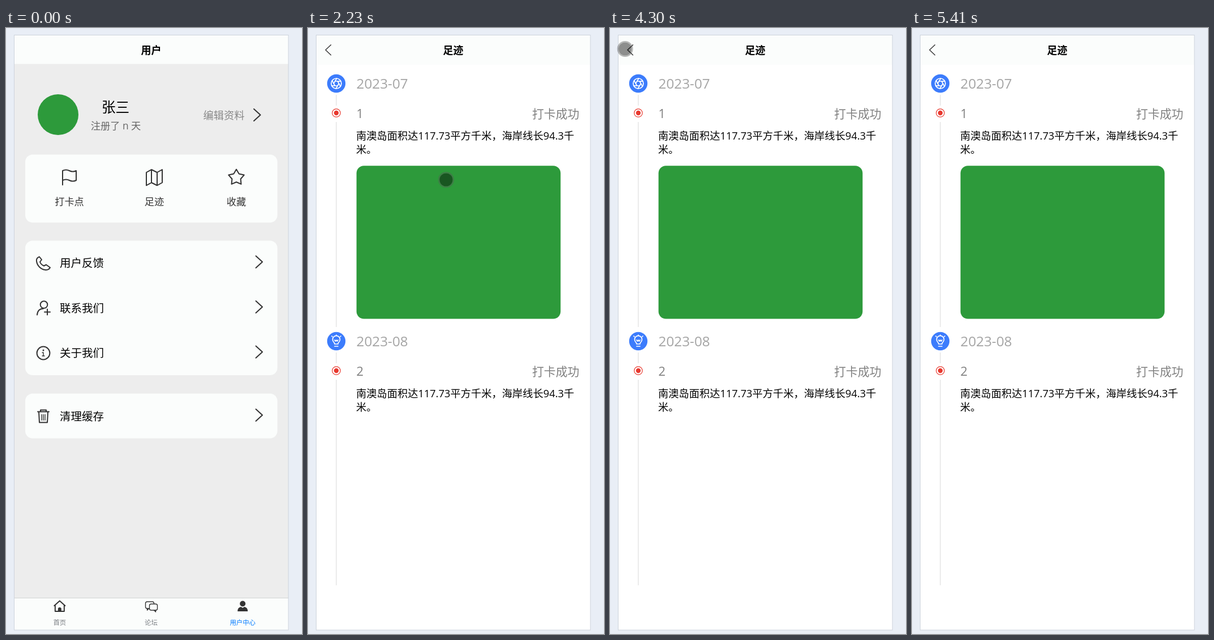
An HTML page for the animation above (6010 ms loop, 523 by 1070 pixels).

```html
<!DOCTYPE html>
<html lang="zh-CN">
<head>
<meta charset="utf-8">
<title>用户</title>
<style>
  html, body { margin: 0; width: 100%; height: 100%; overflow: hidden; background: #e9eef6; }
  svg { display: block; width: 523px; height: 1070px; }
  text { font-family: "Open Sans", "Noto Sans CJK SC", "Noto Sans CJK", sans-serif; }
  .line, .white { fill: none; stroke: #333; stroke-width: 2; stroke-linecap: round; stroke-linejoin: round; }
  .white { stroke: #fff; stroke-width: 1.7; }
  .thin { stroke-width: 1.4; }
  .panel { fill: #fbfdfc; }
  .dark { fill: #333; }
  .green { fill: #2d9a3b; }
  .blue { fill: #3c7cfc; }
  .red { fill: #e8392f; }
  .ring { fill: #fff; stroke: #e8392f; stroke-width: 1.2; }
</style>
</head>
<body>
<svg viewBox="0 0 523 1070" xmlns="http://www.w3.org/2000/svg">
  <g id="user"></g>
  <g id="track"></g>
  <rect x="14.5" y="12.5" width="484.5" height="1050.5" fill="none" stroke="#cdd3dc"/>
  <g id="cursor">
    <circle r="11.6" fill="#000" fill-opacity=".44"/>
    <circle r="12.8" fill="none" stroke="#555" stroke-opacity=".42" stroke-width="2.4"/>
  </g>
</svg>
<script>
const LOOP = 6010;
const STEP = 52;
const LEFT = 14, WIDTH = 485, MIDDLE = LEFT + WIDTH / 2;
const $ = id => document.getElementById(id);

// Text is placed by the vertical middle of its glyphs.
const text = (str, x, mid, size, fill = '#000', anchor = 'middle', weight = 400) =>
  `<text x="${x}" y="${(mid + size * 0.37).toFixed(2)}" font-size="${size}" fill="${fill}" ` +
  `text-anchor="${anchor}" font-weight="${weight}">${str}</text>`;
const rect = (x, y, w, h, cls, r = 0) =>
  `<rect x="${x}" y="${y}" width="${w}" height="${h}" rx="${r}" class="${cls}"/>`;
const block = (y, h, fill) => `<rect x="${LEFT}" y="${y}" width="${WIDTH}" height="${h}" fill="${fill}"/>`;
const circle = (x, y, r, cls) => `<circle cx="${x}" cy="${y}" r="${r}" class="${cls}"/>`;
const path = (d, cls = 'line') => `<path class="${cls}" d="${d}"/>`;
const at = (x, y, shape) => `<g transform="translate(${x} ${y})">${shape}</g>`;
const card = (y, h) => rect(34, y, 445.5, h, 'panel', 13);
const chevron = (x, y) => at(x, y, path('M0-10.5L11.5 0L0 10.5'));
const title = str => text(str, MIDDLE, 39, 18, '#000', 'middle', 700);
const repeat = (n, make) => Array.from({ length: n }, (_, i) => make(i)).join('');
const polar = (r, deg) => {
  const a = deg * Math.PI / 180;
  return `${(r * Math.cos(a)).toFixed(2)} ${(r * Math.sin(a)).toFixed(2)} `;
};

// Icons are drawn around their own centre.
const icons = {
  flag: path('M-12 13V-12q6-3 12 0t12 0V5q-6 3-12 0t-12 0'),
  map: path('M-14-9l9-5 10 5 9-5V9l-9 5-10-5-9 5zM-5-14V9M5-9V14'),
  star: path('M' + repeat(10, i => polar(i % 2 ? 8 : 14.4, i * 36 - 90)) + 'Z'),
  phone: path('M-7-11q-6 2-5 8a18 18 0 0 0 15 15q6 1 9-4l-7-5-4 2q-5-2-7-7l3-4z'),
  contact: circle(1, -6, 6.3, 'line') + path('M-11 12Q-10 1 0 1M2 7h10M7 2v10'),
  info: circle(0, 0, 11.4, 'line') + circle(0, -5, 1.5, 'dark') + path('M-2-1H0V5M-2 5h4', 'line thin'),
  trash: path('M-10-8H10M-5-8v-3H5v3M-8-8l1 19H7L8-8') +
    path(repeat(3, i => `M${i * 3 - 3}-3v10`), 'line thin'),
  home: path('M-9.500-1L0-9.500 9.500-1M-8-2V9H8V-2') + path('M-3 10V5a3 3 0 0 1 6 0v5z', 'dark'),
  chat: rect(-10, -8, 15, 12, 'line thin', 3) + path('M-7 4v3l3-3', 'line thin') +
    rect(-3, -4, 14, 11, 'line thin panel', 3) + path('M8 7v3l-3-3', 'line thin'),
  person: circle(0, -4.5, 5, 'dark') + path('M-9 9q0-7 6-8l3 2 3-2q6 1 6 8z', 'dark'),
  aperture: circle(0, 0, 9, 'white') +
    path(repeat(6, i => `M${polar(4.6, i * 60)}L${polar(4.6, i * 60 + 60)}L${polar(9, i * 60 + 95)}`), 'white'),
  bulb: path('M-3 5q0-2-2-4a6.500 6.500 0 1 1 10 0q-2 2-2 4zM-3 9h6M-3-2l1.500 2L0-2l1.500 2L3-2', 'white') +
    path('M0-10v-1M-7-8l-1-1M7-8l1-1', 'white')
};

function userPage() {
  const shortcuts = [['flag', '打卡点', 112], ['map', '足迹', 262], ['star', '收藏', 407]];
  const rows = [['phone', '用户反馈'], ['contact', '联系我们'], ['info', '关于我们'], ['trash', '清理缓存']];
  const tabs = [['home', '首页'], ['chat', '论坛'], ['person', '用户中心']];
  return [
    block(12, 1051, '#ededed'),
    block(12, 51.5, '#fbfdfc'),
    title('用户'),
    circle(92, 153, 36, 'green'),
    text('张三', 193.5, 139.5, 24.6),
    text('注册了 n 天', 194, 173, 17.3, '#666'),
    text('编辑资料', 385, 154, 18.2, '#888'),
    chevron(438, 153.5),

    card(223.5, 120),
    ...shortcuts.map(([icon, label, x]) =>
      at(x, 264, icons[icon]) + text(label, x, 307, 17.2, '#333')),

    card(375.5, 237.5),
    card(645.5, 79),
    ...rows.map(([icon, label], i) => {
      const y = 415 + i * 79.5 + (icon === 'trash' ? 32 : 0);
      return at(66, y, icons[icon]) + text(label, 95, y, 19.5, '#000', 'start') + chevron(441.5, y - 2);
    }),

    block(1006, 57, '#d2d4d4'),
    block(1007, 56, '#fbfdfc'),
    ...tabs.map(([icon, label], i) => {
      const x = LEFT + WIDTH * (i + 0.5) / 3;
      return at(x, 1021, icons[icon]) + text(label, x, 1050, 11.4, i === 2 ? '#007aff' : '#7a7e83');
    })
  ].join('');
}

function trackEntry(y, month, num, icon, lineEnd) {
  return [
    rect(49.3, y + 20, 1.4, 19, 'rail'),
    rect(49.3, y + 68, 1.4, lineEnd - y - 68, 'rail'),
    at(50, y, circle(0, 0, 16.2, 'blue') + icons[icon]),
    text(month, 85.5, y, 24.3, '#a5a5a5', 'start'),
    circle(50, y + 52, 7.2, 'ring'),
    circle(50, y + 52, 4.2, 'red'),
    text(num, 85.5, y + 53, 22, '#808080', 'start'),
    text('打卡成功', 479.5, y + 53.5, 20.9, '#808080', 'end'),
    text('南澳岛面积达117.73平方千米，海岸线长94.3千', 85, y + 92, 18.25, '#000', 'start'),
    text('米。', 85, y + 116, 18.25, '#000', 'start')
  ].join('');
}

function trackPage() {
  return [
    '<style>.rail { fill: #e3e3e3; }</style>',
    block(12, 1051, '#fff'),
    block(12, 53, '#fbfdfc'),
    title('足迹'),
    at(31, 38.7, path('M9.500-9L0 0l9.500 9', 'line thin')),
    trackEntry(98, '2023-07', '1', 'aperture', 528),
    rect(85.7, 243.2, 360.6, 270.4, 'green', 13),
    trackEntry(553, '2023-08', '2', 'bulb', 984)
  ].join('');
}

// Each sweep of the cursor: when, where from, where to, and an optional point it bends towards.
const sweeps = [
  { start: 180, end: 650, from: [21, 78], to: [219, 360] },
  { start: 1400, end: 2000, from: [234, 370], to: [245, 268], bend: [536, 532] },
  { start: 2230, end: 2810, from: [244, 268], to: [227, 270], bend: [240, 400] },
  { start: 2870, end: 3460, from: [227, 255], to: [237, 360], bend: [289, 380] },
  { start: 3840, end: 4300, from: [234, 355], to: [26.7, 37] },
  { start: 4480, end: 4820, from: [51, 71], to: [248, 274] },
  { start: 5000, end: 5410, from: [246, 270], to: [16, 24], bend: [135, 63] }
];

// The cursor advances in even steps along a quadratic curve.
function cursorAt(t) {
  const { start, end, from, to, bend } = sweeps.findLast(s => s.start <= t);
  const count = Math.round((end - start) / STEP);
  const u = Math.min(1, Math.floor((t - start) / (end - start) * count + 0.2) / count);
  return from.map((a, i) => {
    const b = to[i], c = bend ? bend[i] : (a + b) / 2;
    return (1 - u) ** 2 * a + 2 * u * (1 - u) * c + u * u * b;
  });
}

const show = (id, on) => $(id).setAttribute('visibility', on ? 'visible' : 'hidden');

function draw(t) {
  const onTrack = (t >= 2230 && t < 4480) || t >= 5000;
  const pointing = t >= 180 && t < 5410;
  show('user', !onTrack);
  show('track', onTrack);
  show('cursor', pointing);
  if (pointing) $('cursor').setAttribute('transform', `translate(${cursorAt(t)})`);
}

$('user').innerHTML = userPage();
$('track').innerHTML = trackPage();
const origin = performance.now();
function tick() {
  draw((performance.now() - origin) % LOOP);
  requestAnimationFrame(tick);
}
tick();
</script>
</body>
</html>
```
